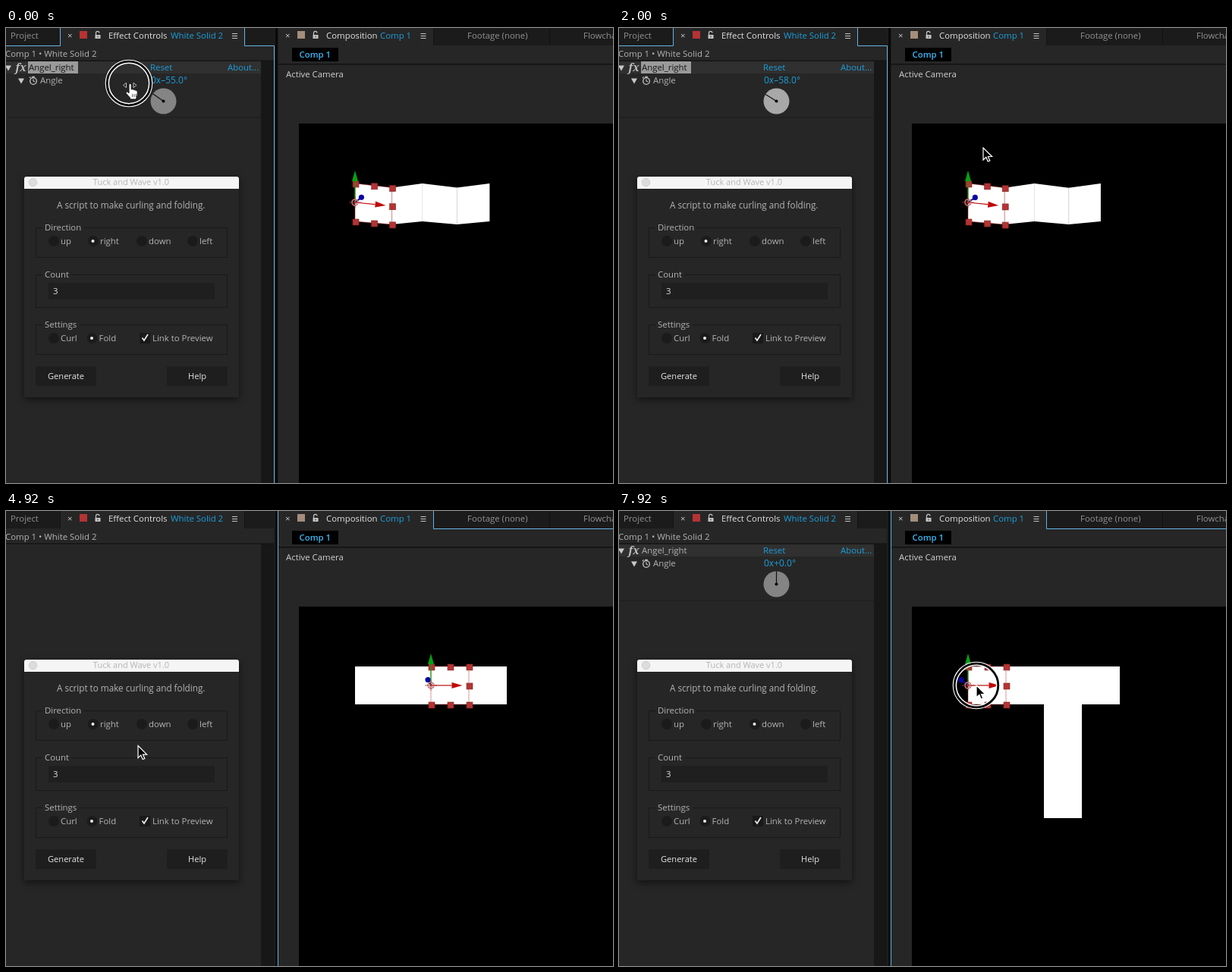
These frames come from a looping animation (800x600 px, 8 s). An HTML page:

```html
<!DOCTYPE html>
<html lang="en">
<head>
<meta charset="utf-8">
<title>Folding panel</title>
<style>
html, body { margin: 0; width: 100%; height: 100%; overflow: hidden; background: #262626; }
svg { display: block; width: 800px; height: 600px; font: 11.4px "Open Sans", "Noto Sans", sans-serif; }
text { white-space: pre; }
#dialog { filter: drop-shadow(0 3px 5px #0008); }
</style>
</head>
<body>
<svg viewBox="0 0 800 600">
  <g id="frame"></g>
  <g id="scene"></g>
  <g id="effect"></g>
  <g id="dialog"></g>
  <g id="pointer"></g>
</svg>
<script>
const LOOP = 8000;
const BLUE = '#1b9fdc', GREY = '#b4b4b4', DIM = '#929292', LINE = '#64b4e6';
const FOCAL = 694, CX = 636, CY = 376;   // camera of a 500 x 500 composition

const $ = id => document.getElementById(id);
const rect = (x, y, w, h, fill, more = '') =>
  `<rect x="${x}" y="${y}" width="${w}" height="${h}" fill="${fill}" ${more}/>`;
const dot = (x, y, r, fill, more = '') => `<circle cx="${x}" cy="${y}" r="${r}" fill="${fill}" ${more}/>`;
const path = (d, stroke, width = 1, fill = 'none', more = '') =>
  `<path d="${d}" fill="${fill}" stroke="${stroke}" stroke-width="${width}" ${more}/>`;
const text = (x, y, s, fill = GREY, more = '') => `<text x="${x}" y="${y}" fill="${fill}" ${more}>${s}</text>`;
const poly = pts => 'M' + pts.map(p => p.join(' ')).join('L') + 'Z';

// Pointer stops: time, x, y
const stops = [
  [0, 162, 73], [780, 228, 68], [1280, 157, 73], [1340, 157, 73], [1660, 770, 120],
  [2000, 480, 158], [2800, 580, 236], [3440, 580, 236], [4120, 210, 366], [4800, 172, 312],
  [5600, 205, 272], [5920, 205, 272], [6560, 96, 463], [6840, 96, 463], [7720, 471, 230], [LOOP, 471, 230]
];

function pointerAt(t) {
  const i = stops.findIndex(s => s[0] > t);
  const [t0, x0, y0] = stops[i - 1], [t1, x1, y1] = stops[i];
  const u = (t - t0) / (t1 - t0), e = u * u * (3 - 2 * u);
  return [x0 + (x1 - x0) * e, y0 + (y1 - y0) * e];
}

function project(x, y, z) {
  const s = FOCAL / (FOCAL + z);
  return [CX + (x - CX) * s, CY + (y - CY) * s];
}

function tabIcons(x, swatch) {
  return text(x, 14, '×', '#c8c8c8') + rect(x + 16, 4, 10, 10, swatch) +
    rect(x + 36.5, 9, 7, 5, '#c4c4c4') + rect(x + 39.5, 10.5, 1, 2, '#262626') +
    path(`M${x + 37.5} 9V6.5a2.2 2.2 0 0 1 4.4 0`, '#c4c4c4', 1.2);
}

const menu = x => path(`M${x} 7.5h7m-7 3h7m-7 3h7`, '#c8c8c8', 1.2);

function frame(focus) {
  return rect(0, 0, 800, 600, '#262626') +
    rect(0, 0, 71, 23, '#1b1b1b') + rect(315, 0, 39, 23, '#1b1b1b') +
    rect(71, 0, 1, 23, '#141414') + rect(314, 0, 1, 23, '#141414') +
    rect(0, 42.5, 354, 1.5, '#141414') + rect(336, 44, 17, 556, '#171717') +
    rect(353, 0, 6, 600, '#1d1d1d') + rect(355, 0, 3, 600, '#080808') +
    rect(563, 0, 237, 23, '#1b1b1b') + rect(563, 0, 1, 23, '#141414') + rect(716, 0, 1, 23, '#121212') +
    rect(359, 47, 441, 1.5, '#111') + rect(377, 26, 61, 18, '#000') + rect(386, 126, 414, 474, '#000') +
    text(6, 14, 'Project', DIM) + tabIcons(81, '#b53334') +
    text(135, 14, 'Effect Controls', '#e2e2e2') + text(217, 14, 'White Solid 2', BLUE) + menu(298) +
    text(-1, 38, 'Comp 1 • White Solid 2') +
    tabIcons(368, '#a48d7b') + text(422, 14, 'Composition', '#e2e2e2') +
    text(493, 14, 'Comp 1', BLUE) + menu(546.5) +
    text(608, 14, 'Footage (none)', DIM) + text(761, 14, 'Flowchart', DIM) +
    text(386.5, 39, 'Comp 1', '#3cb9f7', 'font-weight="600"') + text(369, 65, 'Active Camera', '#d0d0d0') +
    (focus == 'left' ? path('M0 23.5H71.5V0M314.5 0V23.5H353.5V600', LINE) : '') +
    (focus == 'right' ? path('M358.5 0V600M563.5 0V23.5H800', LINE) : '');
}

function arrow([x0, y0], [x1, y1], color) {
  const len = Math.hypot(x1 - x0, y1 - y0), ux = (x1 - x0) / len, uy = (y1 - y0) / len;
  const bx = x1 - ux * 14, by = y1 - uy * 14;
  return path(`M${x0} ${y0}L${bx} ${by}`, color, 1.2) +
    path(poly([[x1, y1], [bx - uy * 4, by + ux * 4], [bx + uy * 4, by - ux * 4]]), 'none', 0, color);
}

function scene(angle, selected, column) {
  const a = -angle * Math.PI / 360, c = Math.cos(a), s = Math.sin(a);
  const joint = (i, y) => project(460 + 50 * c * i, y, i % 2 ? 50 * s : 0);
  const ids = [0, 1, 2, 3, 4];
  let out = path(poly([...ids.map(i => joint(i, 205)), ...ids.reverse().map(i => joint(i, 255))]), 'none', 0, '#fff');
  if (angle) for (const i of [1, 2, 3])
    out += path(`M${joint(i, 205)}L${joint(i, 255)}`, i == 3 ? '#d4d4d4' : '#e4e4e4');
  if (column) out += rect(560, 255, 50, 150, '#fff');

  // Selected layer: border, handles and axes in its own rotated space
  const left = 460 + 50 * selected * c;
  const local = (x, y, z = 0) => project(left + x * c + z * -s, y, x * s + z * c);
  const origin = local(0, 230);
  out += path(poly([local(0, 205), local(50, 205), local(50, 255), local(0, 255)]), '#b83030', 1, 'none', 'stroke-dasharray="1 1"');
  for (const [x, y] of [[0, 205], [25, 205], [50, 205], [50, 230], [50, 255], [25, 255], [0, 255]]) {
    const [hx, hy] = local(x, y);
    out += rect(hx - 3, hy - 3, 8, 8, '#b43434', 'stroke="#842020" stroke-width=".6"');
  }
  const tip = local(0, 230, -34);
  out += path(`M${origin}L${tip}`, '#0a0a9c', 2) + dot(...tip, 3.6, '#0808a0');
  out += arrow(origin, local(0, 188), '#08a012') + arrow(origin, local(41.5, 230), '#c00a0a');
  const [x, y] = origin;
  return out + dot(x, y, 4, 'none', 'stroke="#c88" stroke-width="1.6"') +
    path(`M${x - 8} ${y}h16M${x} ${y - 7}v14M${x - 3} ${y - 3}l6 6m0-6l-6 6`, '#a33', .8);
}

function effect(name, angle, chosen, bright) {
  if (!name) return '';
  const r = angle * Math.PI / 180;
  const value = `0x${angle < 0 ? '–' : '+'}${Math.abs(angle)}.0°`;
  return rect(0, 44, 336, 16, '#303030') + rect(0, 117.5, 336, 1, '#1c1c1c') +
    (chosen ? rect(29, 44, 66, 16, '#9a9a9a') : '') +
    path('M-1 49.5h8l-4 7z', 'none', 0, '#c8c8c8') + path('M16 66.5h8l-4 7z', 'none', 0, '#c8c8c8') +
    text(12.5, 57, 'fx', '#c0c0c0', 'font-family="Noto Serif, serif" font-style="italic" font-weight="700" font-size="14"') +
    text(30, 56, name, chosen ? '#141414' : GREY) + text(190, 56, 'Reset', BLUE) + text(292, 56, 'About...', BLUE) +
    dot(36, 70, 4.3, 'none', 'stroke="#c8c8c8" stroke-width="1.3"') +
    path('M34 64.3h4M36 64v2M36 67.5v2.5l2 1M31 66l1.5-1.5', '#c8c8c8', 1.1) +
    text(45, 73, 'Angle') + text(191, 73, value, BLUE, 'font-size="12" font-weight="500"') +
    dot(207.5, 96.5, 17, bright ? '#a8a8a8' : '#848484') +
    path(`M207.5 96.5l${17 * Math.sin(r)} ${-17 * Math.cos(r)}`, '#111', 1.2) + dot(207.5, 96.5, 2, '#000');
}

function group(y, h, label, gap) {
  return path(`M48 ${y + .5}H39.5v${h}h252v${-h}H${gap}`, '#191919') + text(51, y + 4, label);
}

function radio(x, y, label, on, pressed, ring) {
  return dot(x, y, 7, pressed ? '#000' : '#1b1b1b') + (on ? dot(x - .5, y, 2, '#eee') : '') +
    (ring ? dot(x, y, 6.3, 'none', `stroke="${LINE}" stroke-width="1.2"`) : '') + text(x + 9, y + 4, label);
}

const button = (x, label, pressed) => rect(x, 446, 80, 26, pressed ? '#000' : '#1e1e1e') +
  text(x + 40, 463, label, '#e4e4e4', 'text-anchor="middle" font-size="11.1" font-weight="500"');

function dialog(t) {
  const down = t >= 5920, active = down && t < 7880;
  return '<linearGradient id="bar" x2="0" y2="1"><stop stop-color="#ececec"/><stop offset="1" stop-color="#d0d0d0"/></linearGradient>' +
    path('M24 487V199q0-3 3-3H304q3 0 3 3V487z', 'none', 0, '#262626') +
    path('M24 212V199q0-3 3-3H304q3 0 3 3V212z', 'none', 0, active ? 'url(#bar)' : '#f5f5f5') +
    dot(35.5, 203.5, 5.3, active ? '#f75c58' : '#dcdcdc', `stroke="${active ? '#dd4744' : '#c8c8c8'}" stroke-width=".8"`) +
    text(165, 207, 'Tuck and Wave v1.0', active ? '#505050' : '#b4b4b4', 'text-anchor="middle" font-size="11"') +
    text(67, 238, 'A script to make curling and folding.', GREY, 'font-size="11.7"') +
    group(263, 39, 'Direction', 102) +
    radio(63, 281, 'up') + radio(115, 281, 'right', !down) +
    radio(179, 281, 'down', down, t >= 5680 && !down, active && t < 6840) + radio(246, 281, 'left') +
    group(325, 43, 'Count', 86) + rect(56, 336, 219, 22, '#1f1f1f') + text(62, 351, '3', '#e0e0e0') +
    group(391, 39, 'Settings', 97) + radio(63, 409, 'Curl') + radio(113.5, 409, 'Fold', true) +
    rect(176, 402, 14, 14, '#191919') + path('M179.5 408.5l2.5 3.5 5-8', '#eee', 1.7) + text(193, 413, 'Link to Preview') +
    button(39, 'Generate', t >= 6600 && t < 6800) + button(212, 'Help');
}

function pointer(t, [x, y]) {
  const hand = t < 1300;
  const ring = hand || (t >= 3320 && t < 3480) || t >= 7880;
  const shape = hand
    ? path('M1 2q0-1.8 1.6-1.8T4.2 2V8q2.6-1 3 .5 2-.6 2.6.7 2.4-.5 2.4 1.8V15q0 2-1.4 4v2H2.4V19L-2.6 13.5q-1-1.8.4-2.6 1.4-.3 3.2 2z', '#111', 1, '#fff', 'transform="translate(-1 0)"') +
      path('M4.6 14v4m2.4-4v4m2.4-4v4', '#333', .8) +
      path('M-3.5-.5v6l-4-3zM6-.5v6l4-3z', '#eee', .8, '#111')
    : path('M0 0V16l3.8-3.6 2.4 5.6 2.6-1.1-2.4-5.4h5.2z', '#fff', 1.2, '#000');
  return `<g transform="translate(${x} ${y})">` +
    (ring ? dot(0, 0, 28.6, 'none', 'stroke="#fff" stroke-width="5.4"') +
            dot(0, 0, 28.8, 'none', 'stroke="#000" stroke-width="2.8"') : '') + shape + '</g>';
}

function draw() {
  const t = performance.now() % LOOP, spot = pointerAt(t);
  const first = t < 3320, again = t >= 7880;
  const angle = t < 1280 ? Math.round(-55 + (spot[0] - 162) * .635) : t < 2440 ? -58 : 0;
  const name = first || again ? 'Angel_right' : t >= 6840 ? 'Angel_down' : '';
  $('frame').innerHTML = frame(first ? 'left' : t < 5920 || again ? 'right' : '');
  $('scene').innerHTML = scene(angle, first || again ? 0 : 2, t >= 6840);
  $('effect').innerHTML = effect(name, angle, first, first && t >= 1300);
  $('dialog').innerHTML = dialog(t);
  $('pointer').innerHTML = pointer(t, spot);
  requestAnimationFrame(draw);
}
draw();
</script>
</body>
</html>
```
